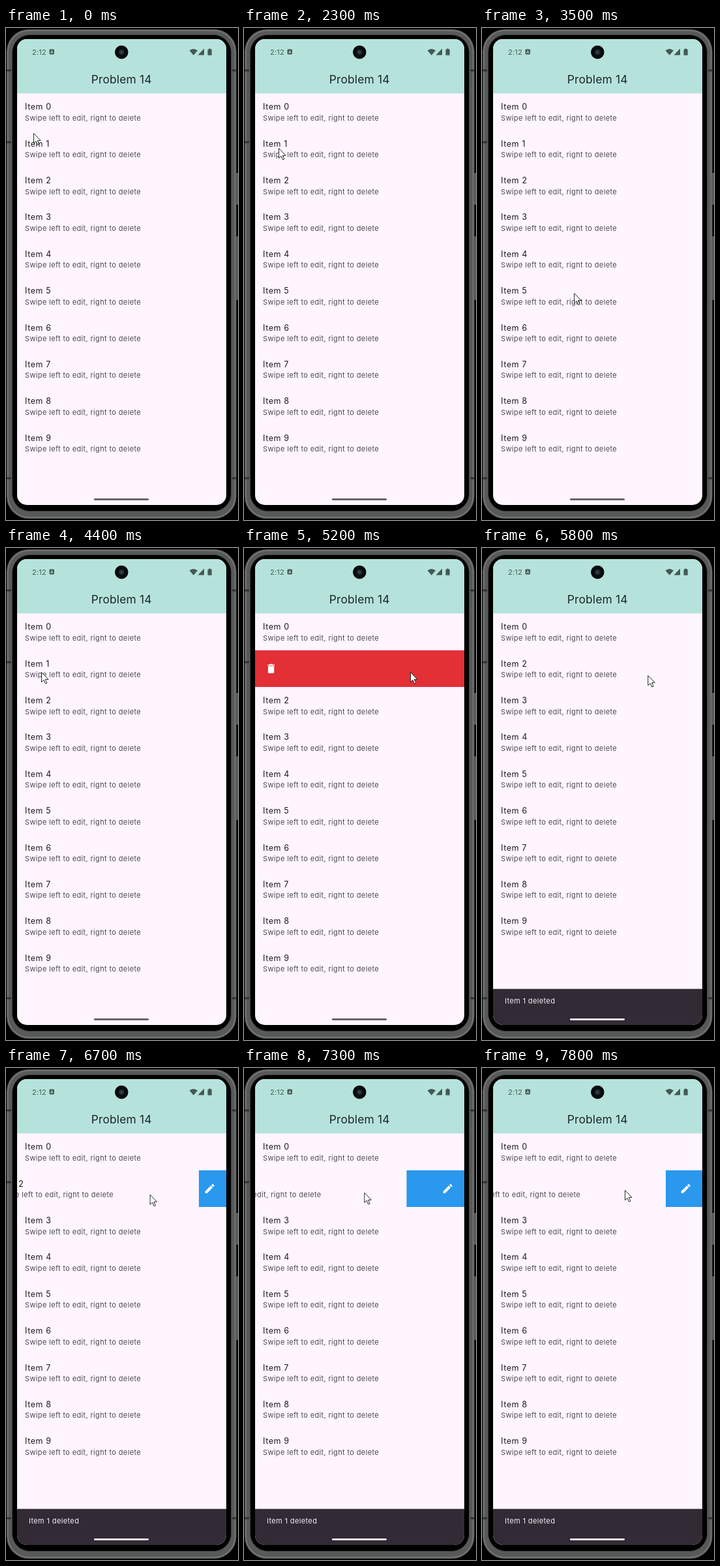
Write an HTML page that moves like this. It is 356x754 px and loops after 8 s.

```html
<!DOCTYPE html>
<html lang="en">
<head>
<meta charset="utf-8">
<title>Swipe list</title>
<style>
  html, body { margin: 0; width: 100%; height: 100%; overflow: hidden; background: #000; }
  svg { display: block; width: 356px; height: 754px; font-family: Inter, "Open Sans", sans-serif; }
  .title { font-size: 12.5px; letter-spacing: .6px; fill: #1d1b20; }
  .sub { font-size: 11px; letter-spacing: .36px; fill: #4e4a54; }
</style>
</head>
<body>
<svg viewBox="0 0 356 754">
  <defs>
    <clipPath id="screen"><rect x="17" y="17" width="321" height="714" rx="15"/></clipPath>
    <clipPath id="reveal"><rect id="revealBox"/></clipPath>
  </defs>

  <!-- phone body -->
  <g fill="#5a5a5a" stroke="#8a8a8a" stroke-width=".8">
    <rect x="351" y="223" width="6" height="47"/>
    <rect x="351" y="320" width="6" height="96"/>
  </g>
  <g fill="none">
    <rect x="1" y="2" width="352.500" height="750" rx="34" fill="#585a5a"/>
    <rect x="3" y="4" width="348.500" height="746" rx="32" stroke="#777" stroke-width="1.500"/>
    <rect x="9.500" y="10.500" width="336" height="730" rx="27" fill="#000" stroke="#3c3c3c"/>
    <path d="M1 65h7M1 175h7M1 690h7M347 65h7M347 690h7" stroke="#333" stroke-width="3"/>
  </g>

  <g clip-path="url(#screen)">
    <rect x="17" y="17" width="321" height="714" fill="#fef5ff"/>
    <g clip-path="url(#reveal)">
      <rect id="fill" x="17" y="156" width="321" height="58"/>
      <path id="icon" fill="#fff"/>
    </g>
    <g id="list"></g>

    <rect x="17" y="17" width="321" height="83.300" fill="#b5e3dc"/>
    <text x="177.200" y="85" font-size="17.400" letter-spacing=".15" text-anchor="middle" fill="#1d2726">Problem 14</text>
    <g fill="#465855">
      <text x="40" y="40.500" font-size="11" letter-spacing=".2">2:12</text>
      <rect x="66.500" y="32.500" width="7.500" height="8" rx="1.500"/>
      <path d="M68.500 38.800l1.800-4.300 1.800 4.300M69.200 37.500h2.200" fill="none" stroke="#b5e3dc" stroke-width=".9"/>
      <path d="M281.500 34.600Q287.700 29.400 294 34.600L287.700 41.800Z"/>
      <path d="M304 31.500V41.500H294.500Z"/>
      <path d="M309.500 32.700h1.800v-1.200h2.600v1.200h1.800v9h-6.200z"/>
    </g>
    <g transform="translate(177.300 37)">
      <circle r="10.300" fill="#080a0b"/>
      <circle r="4.500" fill="#20262b"/>
      <circle r="2" fill="#3c4650"/>
    </g>

    <g id="snack">
      <rect x="17" y="675.700" width="321" height="57" fill="#322b35"/>
      <text x="35" y="698" font-size="11" letter-spacing=".36" fill="#f5eff7">Item 1 deleted</text>
    </g>
    <rect id="home" x="135" y="721" width="84" height="2.800" rx="1.400"/>
  </g>

  <path id="cursor" d="M.5 .5V15.500L4 12.300 6.500 18 8.800 17 6.300 11.400H11Z"
        fill="#fff" stroke="#111" stroke-width=".9" stroke-linejoin="round"/>
</svg>

<script>
const LOOP = 8000, ROW = 56.35, TOP = 100.4, LEFT = 17, WIDTH = 321;
const GRIP = 275, LAG = 50; // where the edit swipe takes hold, and how far the row trails it
const $ = id => document.getElementById(id);

const TRASH = "M6 19c0 1.100.9 2 2 2h8c1.100 0 2-.9 2-2V7H6v12zM19 4h-3.500l-1-1h-5l-1 1H5v2h14V4z";
const PENCIL = "M3 17.250V21h3.750L17.810 9.940l-3.750-3.750L3 17.250zM20.710 7.040c.39-.39.39-1.020 0-1.410l-2.340-2.340c-.39-.39-1.020-.39-1.410 0l-1.830 1.830 3.750 3.750 1.830-1.830z";

// Pointer strokes: start, end, goal
const strokes = [
  [0, 500, 53, 184],
  [2900, 3800, 172, 484],
  [3800, 4400, 54, 190],
  [4600, 5100, 255, 190],
  [5200, 5500, 247, 195],
  [5500, 6400, GRIP, 195],
  [6400, 6900, 191, 193],
  [7100, 7400, 182, 190],
  [7400, 7750, 219, 187]
];

const part = (t, start, end) => Math.min(1, Math.max(0, (t - start) / (end - start)));

function glide(t, start, end) {
  const u = part(t, start, end);
  return u * u * (3 - 2 * u);
}

const easeOut = u => 1 - (1 - u) ** 3;

function pointer(t) {
  let x = 42, y = 161;
  for (const [start, end, goalX, goalY] of strokes) {
    const u = glide(t, start, end);
    x += (goalX - x) * u;
    y += (goalY - y) * u;
  }
  return [x, y];
}

$("list").innerHTML = Array.from({ length: 10 }, (_, i) =>
  `<g><text class="title" x="29" y="25">Item ${i}</text>
   <text class="sub" x="29" y="41.600">Swipe left to edit, right to delete</text></g>`).join("");
const rows = [...$("list").children];

const move = (el, x, y) => el.setAttribute("transform", `translate(${x} ${y})`);
const set = (el, attrs) => Object.entries(attrs).forEach(([k, v]) => el.setAttribute(k, v));

function draw(t) {
  const editing = t > 6400;
  const del = WIDTH * glide(t, 4600, 5100);
  const edit = editing ? Math.min(0, pointer(t - LAG)[0] - GRIP) : 0;
  const shrink = easeOut(part(t, 5220, 5450));

  rows.forEach((row, i) => {
    const x = i === 1 ? del : i === 2 ? edit : 0;
    move(row, x, TOP + (i - (i > 1 ? shrink : 0)) * ROW);
  });

  // Background uncovered by the moving row; the collapse keeps it centred
  const y = TOP + ROW, width = editing ? -edit : del;
  const height = editing ? ROW : ROW * (1 - shrink);
  set($("revealBox"), { x: editing ? LEFT + WIDTH - width : LEFT, y, width, height });
  set($("fill"), { fill: editing ? "#2a98ed" : "#e32f36" });
  set($("icon"), {
    d: editing ? PENCIL : TRASH,
    transform: `translate(${editing ? 303.3 : 32.2} ${y + height / 2 - 9.4}) scale(.78)`
  });

  const snack = easeOut(part(t, 5510, 5760));
  move($("snack"), 0, 57 * (1 - snack));
  $("home").setAttribute("fill", snack > .5 ? "#f1edf3" : "#5d5761");

  move($("cursor"), ...pointer(t));
}

function tick(now) {
  draw(Math.floor(now % LOOP / 100) * 100); // ten steps per second
  requestAnimationFrame(tick);
}
draw(0);
requestAnimationFrame(tick);
</script>
</body>
</html>
```
